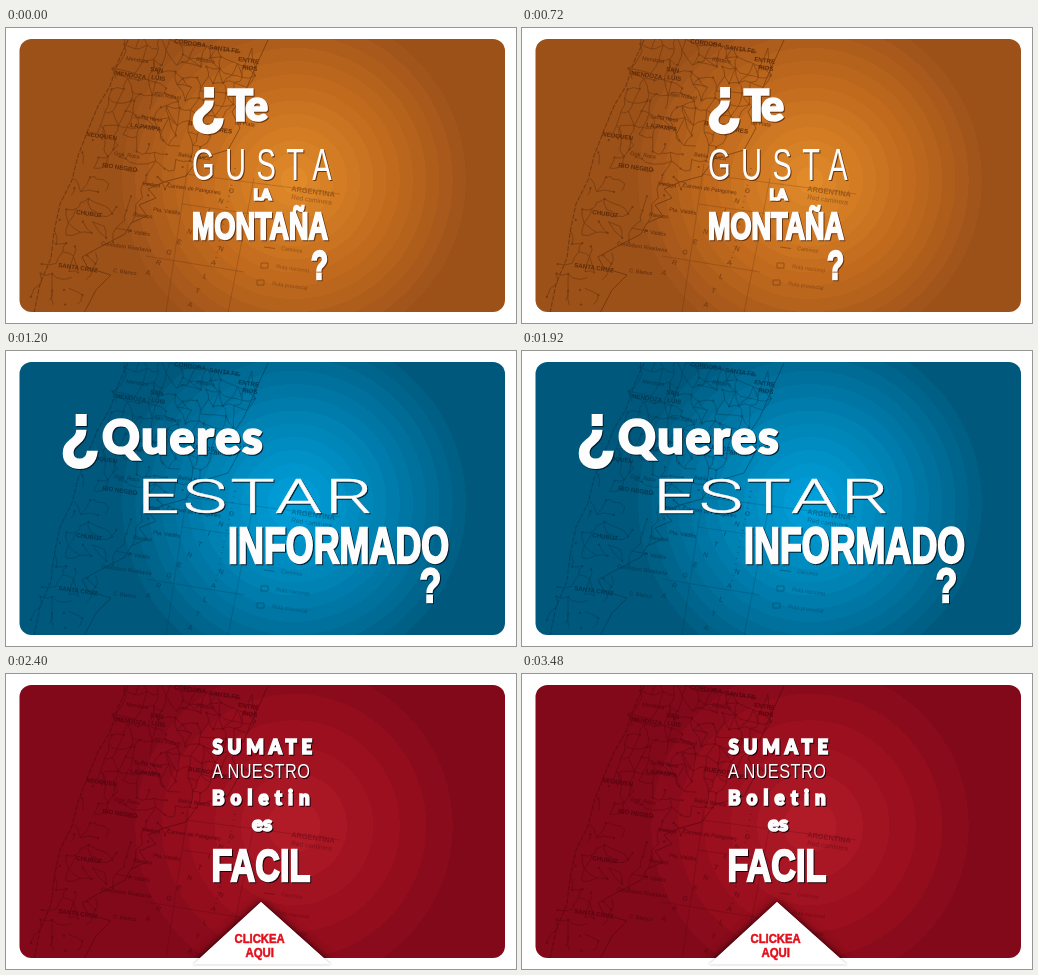
An HTML page for the animation above (4.2 s loop, 510 px wide and 295 px high).

```html
<!DOCTYPE html>
<html lang="es">
<head>
<meta charset="utf-8">
<style>
  html, body { margin: 0; width: 100%; height: 100%; overflow: hidden; background: #fff; }
  svg { display: block; width: 510px; height: 295px; }
  text { vector-effect: non-scaling-stroke; }
  .heavy { font-family: Lato, sans-serif; font-weight: 900; stroke-width: 1.6; }
  .plain { font-family: "Liberation Sans", Arial, sans-serif; stroke-width: 0; }
  .wide { font-family: Roboto, sans-serif; font-weight: 300; stroke-width: .6; }
  .bold { font-family: "Liberation Sans", Arial, sans-serif; font-weight: 700; stroke-width: 2; }
  .small { font-family: "Liberation Sans", Arial, sans-serif; font-weight: 700; stroke-width: .5; }
  .words { fill: #fdfdfd; stroke: #fdfdfd; stroke-linejoin: miter; }
  .map { font-family: "Liberation Sans", Arial, sans-serif; }
</style>
</head>
<body>
<svg id="stage" viewBox="0 0 510 295"></svg>
<script>
const LOOP = 4200;

// words: [class, x, baseline, size, text, width ratio of the face, letter spacing]
const scenes = [
  { end: 1200, colors: ['#e08a2a', '#c46c1e', '#9c5119'], ink: '#4d2206', shade: '#6b330b', bands: 14,
    words: [
      ['bold', 184.5, 94, 65, '¿', .88, 0],
      ['heavy', 221.5, 92.5, 42.5, 'Te', 1, -3],
      ['plain', 186, 151.5, 43.5, 'GUSTA', .67, 15.5],
      ['heavy', 247.5, 171.5, 14.5, 'LA', 1, 0],
      ['bold', 186, 211, 37, 'MONTAÑA', .73, 0],
      ['bold', 305, 250.8, 40, '?', .7, 0]
    ] },
  { end: 2400, colors: ['#00a0da', '#007fb0', '#00597d'], ink: '#003048', shade: '#001e2e', bands: 14,
    words: [
      ['bold', 54, 104, 76, '¿', .86, 0],
      ['heavy', 96, 103, 46.5, 'Queres', 1, 1.7],
      ['wide', 131, 162, 48, 'ESTAR', 1.56, 2],
      ['bold', 222, 211.5, 49.5, 'INFORMADO', .725, 0],
      ['bold', 413.5, 251, 47.5, '?', .75, 0]
    ] },
  { end: LOOP, colors: ['#b01b27', '#9b0f1e', '#820919'], ink: '#4c0410', shade: '#22000a', bands: 7,
    words: [
      ['heavy', 206.5, 79.5, 21, 'SUMATE', .88, 5.5],
      ['plain', 206, 104, 20, 'A NUESTRO', .82, .5],
      ['heavy', 206, 130.5, 20.5, 'Boletin', .92, 6.6],
      ['heavy', 246, 156.5, 20.5, 'es', 1, 0],
      ['bold', 205.5, 206.8, 45, 'FACIL', .76, 0]
    ],
    button: [
      ['small', 228.5, 269.3, 13.6, 'CLICKEA', .83, 0],
      ['small', 239.5, 283.3, 13.6, 'AQUI', .84, 0]
    ] }
];

const labels = [
  [168, 15, 'CORDOBA'], [203, 21, 'SANTA FE'], [232, 33, 'ENTRE'], [236, 41, 'RIOS'],
  [109, 47, 'MENDOZA'], [144, 43, 'SAN'], [145, 51, 'LUIS'], [182, 97, 'BUENOS'],
  [207, 103, 'AIRES'], [124, 99, 'LA PAMPA'], [80, 108, 'NEUQUEN'], [96, 139, 'RIO NEGRO'],
  [70, 186, 'CHUBUT'], [52, 239, 'SANTA CRUZ']
];
const towns = [
  [120, 32, 'Mendoza'], [190, 33, 'Rosario'], [148, 68, 'San Rafael'], [128, 90, 'Santa Rosa'],
  [229, 96, 'La Plata'], [108, 127, 'Gral. Roca'], [172, 128, 'Bahía Blanca'], [136, 157, 'Viedma'],
  [161, 159, 'Carmen de Patagones'], [147, 183, 'Pta. Valdés'], [127, 188, 'Rawson'],
  [122, 205, 'P. Valdés'], [95, 217, 'Comodoro Rivadavia'], [107, 244, 'C. Blanco']
];

function seeded(seed) {
  return () => (seed = (seed * 16807) % 2147483647) / 2147483647;
}

function roads() {
  const rnd = seeded(71), rows = [];
  const jitter = size => (rnd() - .5) * size;
  const pair = p => p.map(v => v.toFixed(1)).join();
  let lines = '', dots = '';
  for (let j = 0; j < 25; j++) {
    const count = j < 10 ? 13 - (j >> 2) : Math.max(5, 11 - Math.floor((j - 9) * .6));
    rows.push(Array.from({ length: count }, (_, i) =>
      [122 - j * 3.9 + i * 11 + jitter(9), 6 + j * 11 + i * 1.6 + jitter(8)]));
  }
  const link = (a, b) => {
    const mid = [(a[0] + b[0]) / 2 + jitter(4), (a[1] + b[1]) / 2 + jitter(4)];
    lines += `M${pair(a)}L${pair(mid)} ${pair(b)}`;
  };
  rows.forEach((row, j) => row.forEach((p, i) => {
    const busy = j < 10 ? .72 : .42;
    const next = rows[j + 1] || [];
    if (row[i + 1] && rnd() < busy) link(p, row[i + 1]);
    if (next[i] && rnd() < busy) link(p, next[i]);
    if (next[i + 1] && rnd() < busy * .4) link(p, next[i + 1]);
    if (rnd() < .45) dots += `<circle cx="${p[0].toFixed(1)}" cy="${p[1].toFixed(1)}" r="1.1"/>`;
  }));
  return `<path d="${lines}" fill="none" stroke="currentColor" stroke-width=".75"/>${dots}`;
}

const tag = (x, y, text, size, weight = 400) =>
  `<text transform="translate(${x} ${y}) rotate(8)" font-size="${size}" font-weight="${weight}">${text}</text>`;

// Letters spread evenly over a slanted line
const spread = (text, x0, y0, x1, y1, turn) => [...text].map((c, i) => {
  const k = i / (text.length - 1);
  return `<text transform="translate(${x0 + (x1 - x0) * k} ${y0 + (y1 - y0) * k}) rotate(${turn})" font-size="7" font-weight="700">${c}</text>`;
}).join('');

function drawMap() {
  const stroke = (d, w, extra = '') =>
    `<path d="${d}" fill="none" stroke="currentColor" stroke-width="${w}" ${extra}/>`;
  const coast = 'M262 12L250 38 238 66 226 84 234 100 222 122 192 131 180 148 158 154 142 161 150 170 133 177 141 188 125 195 119 206 94 219 76 229 82 240 105 247 90 262 78 285';
  const border = 'M122 12L112 34 104 58 92 78 82 102 72 128 66 152 54 176 48 204 45 230 34 256 28 285';
  return `<g class="map" fill="currentColor">
    <g opacity=".6">${roads()}${stroke(coast, 1)}${stroke(border, 1.1, 'stroke-dasharray="5 1.5"')}</g>
    ${labels.map(([x, y, s]) => tag(x, y, s, 6.2, 700)).join('')}
    ${towns.map(([x, y, s]) => tag(x, y, s, 5.4)).join('')}
    <g opacity=".55">
      ${spread('ARGENTINO', 139, 246, 222, 164, 20)}
      ${spread('ATLAN', 181, 278, 212, 222, 20)}
      ${stroke('M182 136L160 285M248 150L222 285M140 228L238 244M176 176L246 186M180 146L334 166', .5)}
      ${stroke('M229 140L208 240', 2, 'stroke-dasharray=".7 5"')}
      ${tag(285, 163, 'ARGENTINA', 7.4, 700)}${tag(285, 171, 'Red caminera', 6.6)}
      ${tag(275, 222, 'Caminos', 5.4)}${tag(270, 240, 'Ruta nacional', 5.4)}${tag(266, 257, 'Ruta provincial', 5.4)}
      ${stroke('M258 219l11 1.5M255 235h7v5h-7zM251 252h7v5h-7z', .9)}
    </g>
  </g>`;
}

function mix(a, b, k) {
  const part = (c, i) => parseInt(c.slice(1 + 2 * i, 3 + 2 * i), 16);
  return `rgb(${[0, 1, 2].map(i => Math.round(part(a, i) + (part(b, i) - part(a, i)) * k))})`;
}

// Concentric rings of flat colour
function glow({ colors: [a, b, c], bands }, id) {
  const at = k => k < .5 ? mix(a, b, k * 2) : mix(b, c, k * 2 - 1);
  const stop = (k, color) => `<stop offset="${k}" stop-color="${color}"/>`;
  let stops = '';
  for (let i = 0; i < bands; i++) {
    const color = at(i / (bands - 1));
    stops += stop(i / bands, color) + stop((i + 1) / bands, color);
  }
  return `<radialGradient id="${id}" gradientUnits="userSpaceOnUse" cx="288" cy="152" r="185">${stops}</radialGradient>`;
}

const word = ([kind, x, y, size, text, ratio, gap]) =>
  `<text class="${kind}" transform="translate(${x} ${y}) scale(${ratio} 1)" font-size="${size}" letter-spacing="${gap}">${text}</text>`;

const card = attrs => `<rect x="13.5" y="11" width="485.5" height="273" rx="12" ${attrs}/>`;

const flap = shadow =>
  `<path d="M255 228L325 290.5H187z" fill="#fff" style="filter:drop-shadow(${shadow})"/>`;

const button = words => `
  <g clip-path="url(#card)">${flap('0 0 5px rgba(25,0,4,.9)')}</g>
  ${flap('0 0 1px rgba(40,0,0,.3)')}
  <g fill="#e2101c" stroke="#e2101c">${words.map(word).join('')}</g>`;

function drawScene(s, i) {
  return `<g class="scene">
    ${card(`fill="url(#glow${i})"`)}
    <g clip-path="url(#card)"><use href="#map" color="${s.ink}" opacity=".8"/></g>
    <g class="words" style="filter:drop-shadow(1.5px 1.5px .3px ${s.shade})">${s.words.map(word).join('')}</g>
    ${s.button ? button(s.button) : ''}
  </g>`;
}

const stage = document.getElementById('stage');
stage.innerHTML = `<defs>
  <clipPath id="card">${card('')}</clipPath>
  ${scenes.map((s, i) => glow(s, 'glow' + i)).join('')}
  <g id="map">${drawMap()}</g>
</defs>${scenes.map(drawScene).join('')}`;

const groups = stage.querySelectorAll('.scene');
const start = performance.now();

function show() {
  const t = (performance.now() - start) % LOOP;
  const now = scenes.findIndex(s => t < s.end);
  groups.forEach((g, i) => { g.style.display = i === now ? '' : 'none'; });
  requestAnimationFrame(show);
}
show();
</script>
</body>
</html>
```
